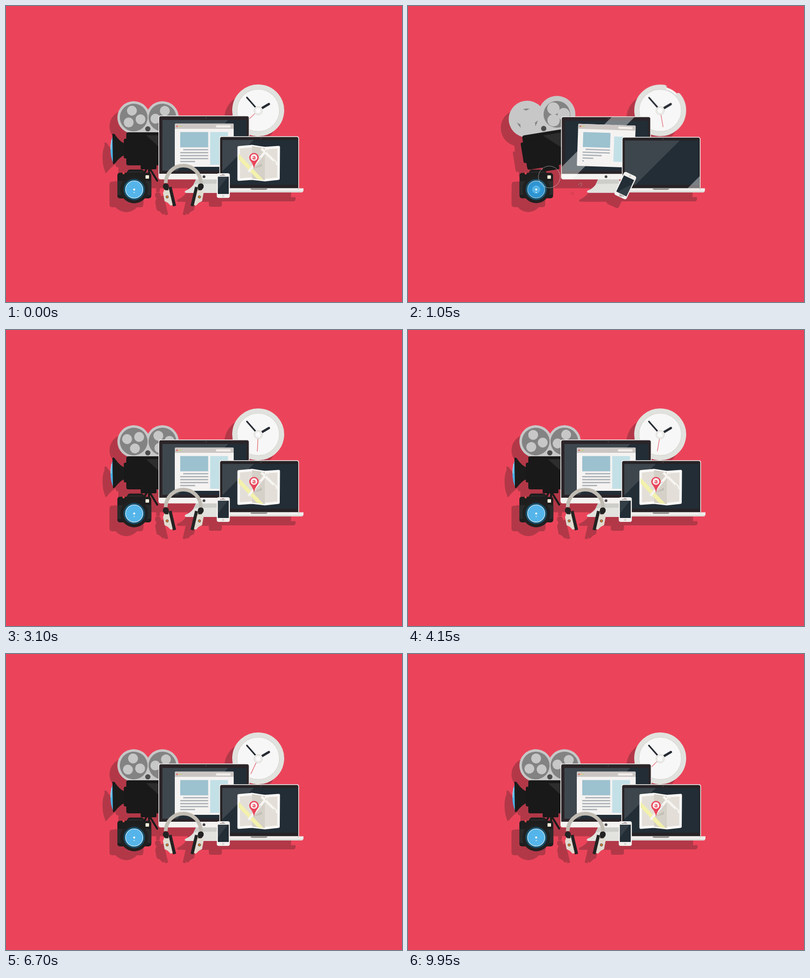
These frames come from a looping animation (800 by 600 pixels, 10 s). An HTML page:

```html
<!DOCTYPE html>
<html lang="en">
<head>
<meta charset="utf-8">
<title>Desk gadgets</title>
<style>
html, body { margin: 0; width: 100%; height: 100%; overflow: hidden; background: #eb445a; }
svg { display: block; width: 800px; height: 600px; }
#scene { filter: drop-shadow(-16px 18.5px 0 #b23848); }
</style>
</head>
<body>
<svg viewBox="0 0 800 600">
<defs>
  <clipPath id="monClip"><rect x="309.5" y="223.5" width="181" height="127" rx="3"/></clipPath>
  <clipPath id="lapClip"><rect x="432.5" y="265.5" width="158" height="104" rx="3"/></clipPath>
  <clipPath id="lapScreen"><rect x="437" y="271.5" width="151" height="91"/></clipPath>
  <clipPath id="mapClip"><path d="M470 286.500 L497 284 L523 288 L551 286 L550.500 350 L523 353 L497 350 L470 352Z"/></clipPath>
  <g id="cup">
    <path d="M321 371 L329 369 L337 402 L333 404 L327 398 L321 395 L318 379Z" fill="#e0dbd0" stroke="#e0dbd0" stroke-width="1.500" stroke-linejoin="round"/>
    <path d="M322 359.500 q7 0 7 7 l-1 7 h-6 q-5 -4 -5 -8 q0 -5 5 -6Z" fill="#232323"/>
    <path d="M331.500 367 L340.500 405.500" stroke="#232323" stroke-width="6.300"/>
    <circle cx="325.600" cy="387" r="2.500" fill="#e08336" stroke="#4a4038"/>
  </g>
</defs>
<rect width="800" height="600" fill="#eb445a"/>

<g id="scene">
  <g id="clock">
    <circle cx="509.500" cy="211.500" r="48" fill="#f7f7f7"/>
    <circle cx="509.500" cy="211.500" r="43" fill="none" stroke="#cfcfcb" stroke-width="1.500"/>
    <circle id="rim" cx="509.500" cy="211.500" r="47.750" fill="none" stroke="#e1e2de" stroke-width="9.500" stroke-linecap="round" pathLength="360" transform="rotate(-40 509.500 211.500)"/>
    <g id="hands" stroke-linecap="round">
      <path d="M509.500 211.500 L486.700 185.500" stroke="#262b33" stroke-width="3.300"/>
      <path d="M509.500 211.500 L531 198.700" stroke="#262b33" stroke-width="4.800"/>
      <path id="second" d="M509.500 211.500 V246" stroke="#dd4650" stroke-width="1"/>
      <circle cx="509.500" cy="212" r="8.500" fill="#f4f4f2" stroke="#dcdcd8" stroke-width="1.500"/>
      <circle cx="509.500" cy="212" r="6" fill="#fafafa" stroke="#d6d6d2" stroke-width=".8"/>
    </g>
  </g>

  <g id="video">
    <g id="legs" stroke="#1b1b1b" stroke-width="4" stroke-linecap="round">
      <path d="M284 330 L272 352 M289 330 V352 M292 332 L305.500 354"/>
    </g>
    <g id="hood">
      <path d="M217 261 Q211 273 211 290 Q211 307 217 319Z" fill="#4eb2e9"/>
      <path d="M213.500 271 Q211.800 280 212 291" fill="none" stroke="#b9e2f7" stroke-width="1.200"/>
      <path d="M215 259 Q219 258 221 262 Q230 275 240 279 V302 Q230 306 221 318 Q219 321 216 320 Z" fill="#1b1b1b"/>
    </g>
    <path d="M262 240 H312 V258 H270Z" fill="#c7c7c7"/>
    <circle id="rimA" cx="258" cy="226" r="33" fill="#c7c7c7"/>
    <circle id="rimB" cx="316" cy="226" r="33" fill="#c7c7c7"/>
    <g id="reelA"></g>
    <g id="reelB"></g>
    <circle id="axle" cx="286.500" cy="249" r="5.300" fill="#4d4d4d"/>
    <rect x="238" y="269" width="12" height="40" rx="3" fill="#191919"/>
    <rect x="243" y="256" width="82" height="67" rx="4" fill="#191919"/>
    <path d="M283 262 H318 V294Z" fill="#2d2d2d"/>
    <rect x="272" y="320" width="32" height="11" rx="2" fill="#191919"/>
  </g>

  <g id="monitor">
    <path d="M384 349 H426 L436 379 H364 Q359 378 362.500 374.500 Q381 367 384 349Z" fill="#e2e2df"/>
    <path d="M384 351 H426 V360 L379 361Z" fill="#cdcdca"/>
    <rect x="308" y="222" width="184" height="129.500" rx="4.500" fill="#f4f2f0"/>
    <path d="M309.500 340 V227 Q309.500 223.500 313 223.500 H487 Q490.500 223.500 490.500 227 V340Z" fill="#2b2428"/>
    <rect x="316" y="231" width="170" height="103" fill="#222d36"/>
    <path id="monTint" d="M316 231 H449 L346 334 H316Z" fill="#3e474e"/>
    <circle cx="404.500" cy="226.500" r=".8" fill="#77787c"/>
    <circle cx="400" cy="346" r="2.800" fill="#464346"/>
    <g clip-path="url(#monClip)"><path id="monGleam" fill="#fff" opacity=".4"/></g>
    <g id="window">
      <rect x="341" y="238.500" width="119" height="87.500" rx="1.500" fill="#f5f3f2"/>
      <path d="M341 249 V240 Q341 238.500 342.500 238.500 H458.500 Q460 238.500 460 240 V249Z" fill="#cbc6c4"/>
      <circle cx="345.500" cy="243.800" r="1.500" fill="#e0544f"/>
      <circle cx="349.500" cy="243.800" r="1.500" fill="#e9c566"/>
      <circle cx="353.500" cy="243.800" r="1.500" fill="#b9d48a"/>
      <rect x="424" y="241.800" width="30" height="4.400" rx="2" fill="#f1eeec"/>
      <rect x="352" y="255.500" width="56.500" height="31" fill="#9cc1cf"/>
      <rect id="side" x="412.500" y="255.500" width="36" height="66.500" fill="#c3e0e7"/>
      <g id="lines" fill="#acb2b7"></g>
    </g>
  </g>

  <g id="laptop">
    <rect x="431" y="264" width="161" height="108" rx="4.500" fill="#f3f1ef"/>
    <path d="M432.500 369.500 V269 Q432.500 265.500 436 265.500 H587 Q590.500 265.500 590.500 269 V369.500Z" fill="#272225"/>
    <rect x="437" y="271.500" width="151" height="91" fill="#222d36"/>
    <g clip-path="url(#lapScreen)"><path id="lapTint" fill="#3d464c"/></g>
    <circle cx="515" cy="268.300" r=".9" fill="#67686c"/>
    <g id="map">
      <path d="M470 286.500 L497 284 L523 288 L551 286 L550.500 350 L523 353 L497 350 L470 352Z" fill="#e3dfd8" stroke="#fbfaf8" stroke-width="5" stroke-linejoin="round"/>
      <g clip-path="url(#mapClip)">
        <path d="M497 280 L523 284 V356 L497 352Z" fill="#d5d0c8"/>
        <path d="M464 299 L520 358" stroke="#f3f1ac" stroke-width="8"/>
        <path d="M533 284 L490 336 M516 289 L556 328" stroke="#f7f5f1" stroke-width="5"/>
        <path d="M524 296 l4 -5 M511 311 l3 -4 M540 314 l5 5" stroke="#b5b0a8" stroke-width="1"/>
        <path d="M501 329 l16 -10 v6Z" fill="#c4bfb6"/>
      </g>
      <g id="pin">
        <path d="M501 329 Q499 320 494 314 A9.600 9.600 0 1 1 508 314 Q503 320 501 329Z" fill="#e9445a"/>
        <circle cx="501" cy="307" r="6.800" fill="#f8f4f2"/>
        <text x="501" y="311" text-anchor="middle" font-family="Roboto, Arial, sans-serif" font-size="13" font-weight="700" fill="#e9445a">a</text>
      </g>
    </g>
    <path d="M427 369.500 H601 V373 Q601 378 596 378 H427Z" fill="#f1efed"/>
    <path d="M427 375 H600 Q599 378 596 378 H427Z" fill="#dcdbd7"/>
    <path d="M494 370 H528 Q527.500 372.500 525 372.500 H497 Q494.500 372.500 494 370Z" fill="#85827f"/>
    <circle cx="591" cy="371.500" r=".8" fill="#a9a6a2"/>
    <g clip-path="url(#lapClip)"><path id="lapGleam" fill="#fff" opacity=".4"/></g>
  </g>

  <g id="camera">
    <path d="M242 341 L246 334 Q247 331.500 250 331.500 H274 Q277 331.500 278 334 L282 341Z" fill="#1d1d1d"/>
    <rect x="225" y="338" width="68.500" height="52" rx="5" fill="#1e1e1e"/>
    <rect x="225" y="355" width="68.500" height="28" fill="#2a2a2a"/>
    <path d="M247 336.500 H277" stroke="#303030" stroke-width="1.500"/>
    <circle cx="237.500" cy="339" r="2.200" fill="#e5484c"/>
    <rect x="281.800" y="343" width="7.200" height="7" rx="1" fill="#f3eedb"/>
    <circle cx="259" cy="372" r="28" fill="#202020"/>
    <circle cx="259" cy="372" r="21.500" fill="#17506c"/>
    <circle cx="259" cy="372" r="17.500" fill="#2e94d1"/>
    <circle id="glass" cx="259" cy="372" fill="#55b5ea"/>
    <circle id="glassRim" cx="259" cy="372" r="17.500" fill="none" stroke="#e9f5fb" stroke-width="1.100"/>
    <circle cx="259" cy="372" r="2.100" fill="#fff"/>
    <circle cx="259" cy="378" r="1.100" fill="#e6f4fb"/>
  </g>

  <g id="phones">
    <path d="M322.700 357 V358.500 A35.500 35.500 0 0 1 393.700 358.500 V357" transform="translate(0 .5)" fill="none" stroke="#c1bcb3" stroke-width="7.500" stroke-linecap="round"/>
    <use href="#cup"/>
    <use href="#cup" transform="translate(716.400 0) scale(-1 1)"/>
  </g>

  <g id="mobile">
    <rect x="425.800" y="339" width="26.400" height="50" rx="4" fill="#f2f0ee"/>
    <rect x="428" y="346" width="22" height="35" fill="#222d36"/>
    <path d="M428 346 H448 L428 372Z" fill="#343e46"/>
    <path d="M436 341.500 H441 M432 343.500 H442.500" stroke="#8b7d7c" stroke-width="1.200"/>
    <circle cx="438.700" cy="385" r="1.700" fill="none" stroke="#b5b0ad" stroke-width=".8"/>
  </g>
</g>
<circle id="flash" cx="285.500" cy="346.500" fill="none" stroke="#fff" stroke-width=".8"/>
</svg>

<script>
const $ = id => document.getElementById(id);
const set = (id, attrs) => { for (const k in attrs) $(id).setAttribute(k, attrs[k]); };
const clamp = x => Math.max(0, Math.min(1, x));
const part = (t, start, dur) => clamp((t - start) / dur);
const easeOut = u => 1 - (1 - u) ** 3;

// damped spring from 0 to 1, peaking near 1.12
function spring(t, start) {
  const u = (t - start) / 1000;
  return u <= 0 ? 0 : u > 1.6 ? 1 : 1 - Math.exp(-6.6 * u) * Math.cos(9 * u);
}

function place(id, x, y, scale, turn) {
  set(id, {
    transform: `translate(${x} ${y}) rotate(${turn}) scale(${scale}) translate(${-x} ${-y})`,
    visibility: scale > 0.001 ? 'inherit' : 'hidden'
  });
}

// id, start, anchor x, anchor y, degrees of turn per missing scale
const pops = [
  ['monitor', 420, 400, 351, 0],
  ['clock', 230, 509.5, 211.5, 0],
  ['laptop', 400, 511, 372, 0],
  ['camera', 350, 259, 368, 0],
  ['window', 420, 400, 283, 150],
  ['hands', 450, 509.5, 211.5, 0],
  ['rimA', 670, 258, 226, 0],
  ['rimB', 670, 316, 226, 0],
  ['axle', 890, 286.5, 249, 0],
  ['side', 930, 430.5, 288.7, 0],
  ['phones', 1040, 348, 361, 40],
  ['legs', 1250, 290, 328, 0],
  ['hood', 1300, 242, 290, 0],
  ['map', 1400, 510, 319, 0],
  ['pin', 1650, 501, 329, 0]
];

function makeReel(id) {
  $(id).innerHTML = '<circle r="28" fill="#838383"/>' +
    '<circle cx="14.300" fill="#c7c7c7"/>'.repeat(3);
}

function drawReel(id, x, grow, angle) {
  const g = $(id);
  g.setAttribute('transform', `translate(${x} 226) rotate(${angle}) scale(${grow})`);
  [...g.children].slice(1).forEach((hole, i) => {
    hole.setAttribute('r', 10 + 36 * (1 - grow));
    hole.setAttribute('transform', `rotate(${i * 120})`);
  });
}

// 45 degree stripe between x + y = a and x + y = b
const stripe = (a, b) => `M${a - 200} 200 L${b - 200} 200 L${b - 420} 420 L${a - 420} 420Z`;

makeReel('reelA');
makeReel('reelB');
const lines = [0, 1, 2, 3, 4].map(i => {
  const r = document.createElementNS('http://www.w3.org/2000/svg', 'rect');
  const x = i ? 352 : 358;
  r.setAttribute('x', x);
  r.setAttribute('y', 290 + 6 * i);
  r.setAttribute('height', 2.6);
  $('lines').append(r);
  return { r, full: i === 4 ? 30 : 408.5 - x };
});

function draw(ms) {
  let t = Math.floor(ms / 50) * 50 % 10000;
  if (t < 50) t += 10050; // the loop opens on the finished picture

  for (const [id, start, x, y, turn] of pops) {
    const s = spring(t, start);
    place(id, x, y, s, turn * (1 - s));
  }
  const swing = spring(t, 770);
  place('video', 298, 320, Math.min(swing, 1.05), 72 * (1 - swing));
  place('mobile', 439, 364, spring(t, 600), -360 * (1 - part(t, 600, 900)) ** 1.22);

  const angle = 80 - 0.182 * (t - 3100);
  drawReel('reelA', 258, easeOut(part(t, 838, 600)), angle);
  drawReel('reelB', 316, easeOut(part(t, 709, 600)), angle + 35);

  const sweep = 360 * part(t, 300, 830);
  set('rim', { 'stroke-dasharray': sweep < 360 ? `${sweep * 0.985} 400` : 'none' });
  set('second', { transform: `rotate(${3 + 6.2 * (t - 3100) / 1000} 509.5 211.5)` });

  lines.forEach((l, i) => l.r.setAttribute('width', l.full * part(t, 790 + 60 * i, 200)));

  set('monTint', { opacity: part(t, 1080, 300) });
  set('lapTint', { d: stripe(500, 772 + 49 * (1 - part(t, 1060, 300))) });
  set('monGleam', { d: stripe(t - 415, t - 368) });
  set('lapGleam', { d: stripe(t - 115, t - 66) });

  const open = part(t, 880, 360);
  set('glass', { r: 17.5 * open });
  set('glassRim', { opacity: 0.4 + 0.6 * open });
  const f = part(t, 900, 300);
  set('flash', { r: 44 * f, opacity: f > 0 && f < 1 ? 1.2 * (1 - f) : 0 });
}

const began = performance.now();
function tick() {
  draw(performance.now() - began);
  requestAnimationFrame(tick);
}
tick();
</script>
</body>
</html>
```
